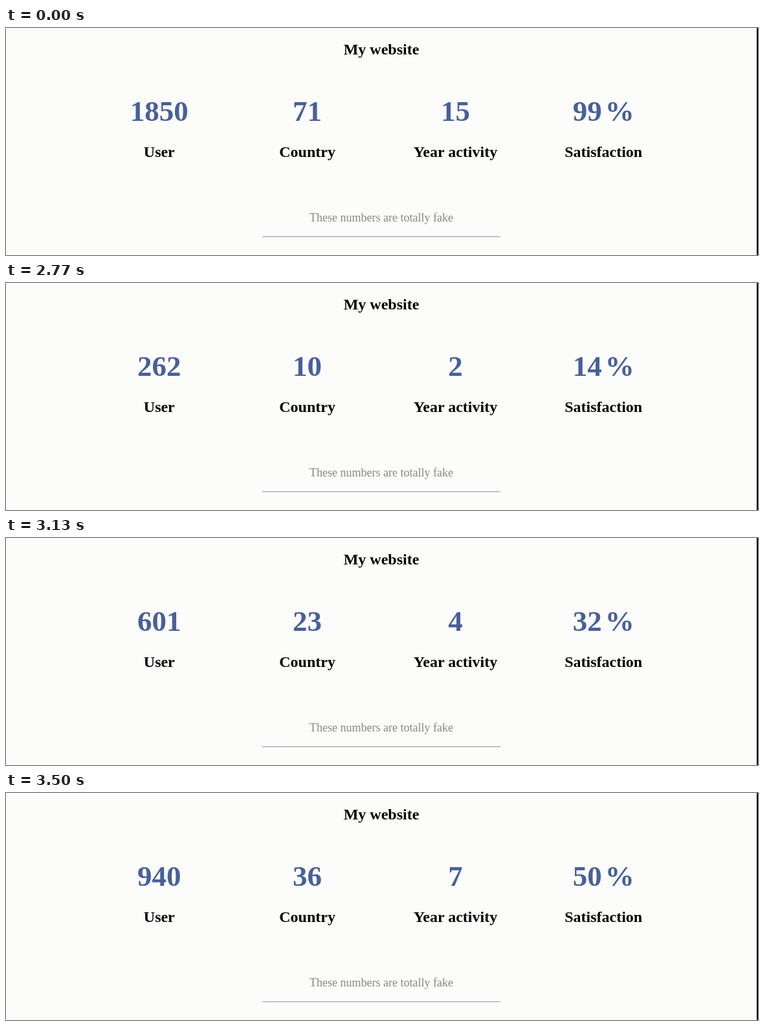
Write an HTML page that moves like this. It is 1162 by 352 pixels and loops after 3530 ms.

```html
<!DOCTYPE html>
<html lang="en">
<head>
<meta charset="utf-8">
<title>My website</title>
<style>
  html, body { margin: 0; height: 100%; overflow: hidden; background: #fcfcfa; }
  body { position: relative; font-family: "Liberation Serif", "Times New Roman", serif; }
  div, hr { position: absolute; margin: 0; white-space: nowrap; text-align: center; }
  .row { left: 8px; width: 1144px; }
  .stat { top: 0; width: 228.8px; }
  .stat div { left: 0; width: 100%; }
  .head { font: bold 24px/26px "Liberation Serif", "Times New Roman", serif; color: #000; }
  .count { top: 104px; font-size: 45px; font-weight: bold; line-height: 50px; color: #48609a; }
  .unit { margin-left: 5px; }
  .note { top: 284px; font-size: 18px; line-height: 20px; color: #878a80; }
  hr { left: 396px; top: 323px; width: 368px; height: 1px; border: 0;
       background: #a29fb8; border-bottom: 1px solid #eaeaee; }
  .edge { left: 1160px; top: 0; width: 2px; height: 352px; background: #000; }
</style>
</head>
<body>
<div class="row head" style="top: 20px">My website</div>
<div class="row note">These numbers are totally fake</div>
<hr>
<div class="edge"></div>
<script>
const LOOP = 3530, HOLD = 2500, COUNT_TIME = 2000;
const STEP = 100 / 3, TICK = 1000 / 60;

const stats = [
  { label: "User", goal: 1850 },
  { label: "Country", goal: 71 },
  { label: "Year activity", goal: 15 },
  { label: "Satisfaction", goal: 99, unit: "%" }
];

function add(parent, tag, className, text = "") {
  const el = document.createElement(tag);
  el.className = className;
  el.textContent = text;
  return parent.appendChild(el);
}

stats.forEach((stat, i) => {
  const column = add(document.body, "div", "stat");
  column.style.left = 122.4 + i * 228.8 + "px";
  const count = add(column, "div", "count");
  stat.value = add(count, "span", "");
  if (stat.unit) add(count, "span", "unit", stat.unit);
  add(column, "div", "head", stat.label).style.top = "179px";
});

// Share of the goal reached; the display refreshes on a 10 ms grid, about 30 times a second.
function progress(time) {
  if (time < HOLD) return 1;
  const step = Math.floor((time - HOLD + 5) / STEP);
  return step ? (2 * step + 1) * TICK / COUNT_TIME : 0;
}

function draw(time) {
  const part = progress(time % LOOP);
  for (const { goal, value } of stats) {
    const shown = String(Math.floor(goal * part + 1e-6));
    if (value.textContent !== shown) value.textContent = shown;
  }
}

const start = performance.now();
function frame() {
  draw(performance.now() - start);
  requestAnimationFrame(frame);
}
frame();
</script>
</body>
</html>
```
